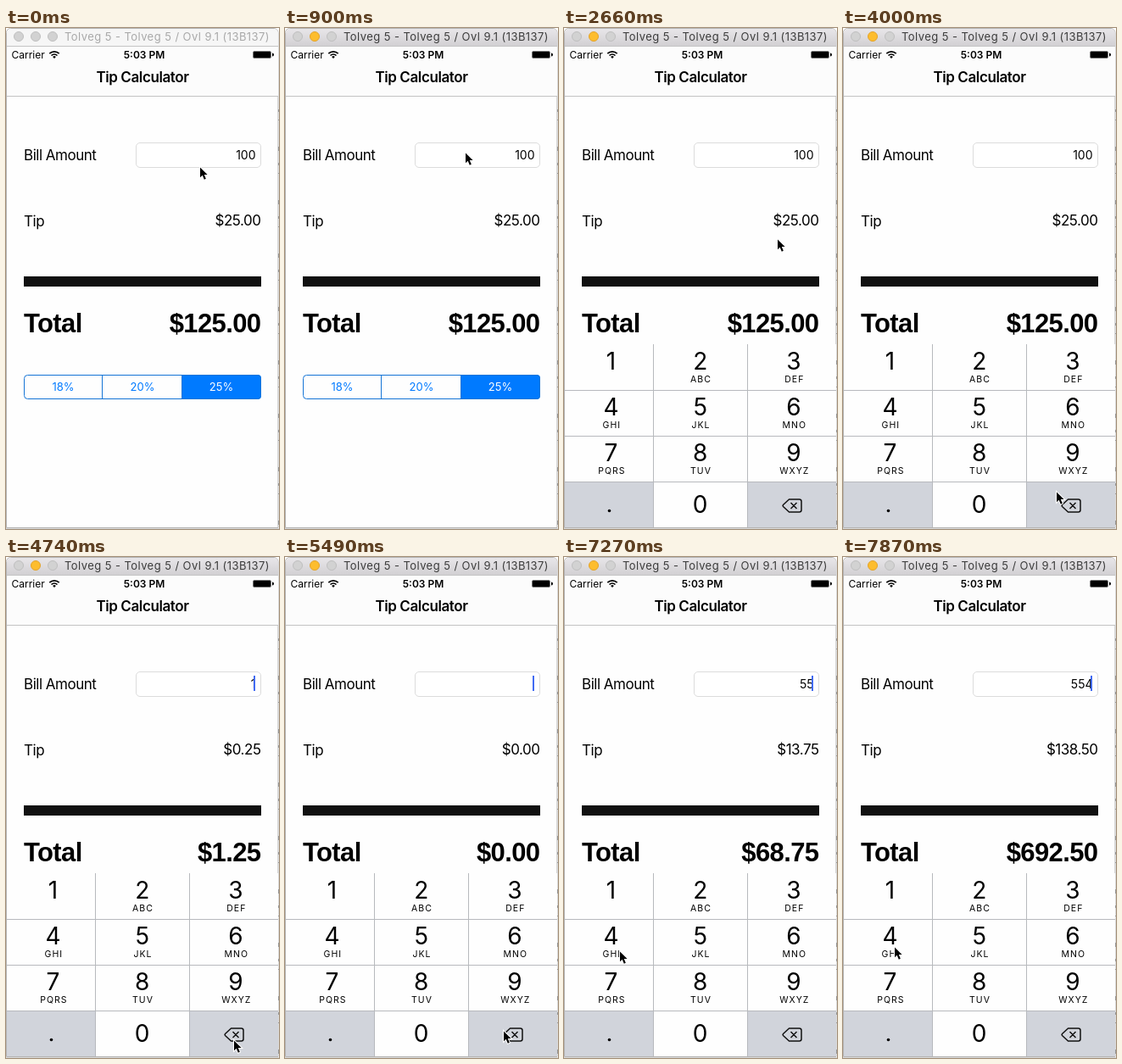
Recreate the animation shown at these times as an HTML page. Size 322 px wide and 591 px high, loop 8 s.

```html
<!DOCTYPE html>
<html lang="en">
<head>
<meta charset="utf-8">
<title>Tip Calculator</title>
<style>
html, body { margin: 0; width: 100%; height: 100%; overflow: hidden; background: #fff; }
svg { display: block; width: 322px; height: 591px; font-family: Inter, Roboto, sans-serif; }
.light { fill: #d2d2d2; stroke: #bfbfbf; }
.active .mid { fill: #fdbd2e; stroke: #e3a32b; }
.bar { fill: #f6f6f6; }
.active .bar { fill: url(#chrome); }
.name { font-size: 13px; letter-spacing: .44px; fill: #a9a9a9; }
.active .name { fill: #3c3c3c; }
.label { font-size: 17px; letter-spacing: -.48px; }
.big { font: bold 31px "Liberation Sans", Arial, sans-serif; letter-spacing: -.6px; }
.end { text-anchor: end; }
.center, .name, .digit, .abc, .seg { text-anchor: middle; }
.digit { font-size: 28px; }
.abc { font-size: 10.5px; letter-spacing: 1px; }
.seg { font-size: 13px; fill: #007aff; }
.line { fill: none; stroke: #b7b9bd; }
</style>
</head>
<body>
<svg id="stage" viewBox="0 0 322 591">
  <defs>
    <linearGradient id="chrome" x2="0" y2="1">
      <stop stop-color="#e8e6e9"/><stop offset="1" stop-color="#d2d0d3"/>
    </linearGradient>
    <clipPath id="screen"><rect x="1" y="22" width="320" height="567"/></clipPath>
  </defs>
  <path d="M321.5 96V591" stroke="#777" stroke-dasharray="3 9 1 31 5 14"/>
  <path d="M0 590.5H322" stroke="#d8d8d8"/>
  <path d="M.5 589V5.5a5 5 0 0 1 5-5H316a5 5 0 0 1 5 5V589.5H.5Z" fill="#fefefe" stroke="#b4b4b4"/>
  <path class="bar" d="M1 21V6a5 5 0 0 1 5-5H316a5 5 0 0 1 5 5V21Z"/>
  <path d="M1 21.5H321" stroke="#c4c4c4"/>
  <circle class="light" cx="15" cy="10" r="5.5"/>
  <circle class="light mid" cx="35" cy="10" r="5.5"/>
  <circle class="light" cx="55" cy="10" r="5.5"/>
  <text class="name" x="190" y="15">Tolveg 5 - Tolveg 5 / Ovl 9.1 (13B137)</text>

  <rect x="1" y="22" width="320" height="58" fill="#fcfcfc"/>
  <path d="M1 80.5H321" stroke="#c3c3c3"/>
  <text x="6.5" y="35.5" font-size="12">Carrier</text>
  <path d="M51.3 30.2a8.2 8.2 0 0 1 11.4 0M53.5 32.5a5 5 0 0 1 7 0" fill="none" stroke="#000" stroke-width="1.7"/>
  <path d="M57 36l-1.9-2a2.7 2.7 0 0 1 3.8 0Z"/>
  <text class="center" x="163" y="35.5" font-size="12" font-weight="600">5:03 PM</text>
  <rect x="291.5" y="27.5" width="21" height="8" rx="1.5" stroke="#777"/>
  <path d="M314 29.5a2 2 0 0 1 0 4Z"/>
  <text class="center" x="161" y="64" font-size="17" font-weight="600" letter-spacing="-.4">Tip Calculator</text>

  <text class="label" x="21" y="155.5">Bill Amount</text>
  <rect x="153.5" y="135.5" width="147" height="29" rx="4.5" fill="#fff" stroke="#dcdcdc"/>
  <text id="bill" class="end" x="294.5" y="154.5" font-size="14"></text>
  <rect id="caret" x="292" y="140" width="2" height="18" fill="#426bf2"/>
  <text class="label" x="21" y="233.5">Tip</text>
  <text id="tip" class="label end" x="300.5" y="232.5"></text>
  <rect x="21" y="293" width="280" height="12" fill="#111"/>
  <text class="big" x="21" y="359">Total</text>
  <text id="total" class="big end" x="300.5" y="359"></text>

  <path d="M207 409H297a4 4 0 0 1 4 4V434a4 4 0 0 1-4 4H207Z" fill="#007aff"/>
  <rect x="21.5" y="409.5" width="279" height="28" rx="4" fill="none" stroke="#1474d6"/>
  <path d="M113.5 409V438M207.5 409V438" stroke="#1474d6"/>
  <text class="seg" x="67.5" y="428">18%</text>
  <text class="seg" x="161" y="428">20%</text>
  <text class="seg" x="254" y="428" style="fill:#fff">25%</text>

  <g clip-path="url(#screen)"><g id="pad"></g></g>
  <path id="mouse" d="M1 1.5V13.2L3.7 10.8L5.8 15.7L7.8 14.8L5.8 10H9.6Z" stroke="#fff" stroke-width="2" paint-order="stroke"/>
</svg>
<script>
const STEP = 148.3, LOOP = 8000;
const GRAY = '#d1d4db', WHITE = '#fefefe';
const FOCUS = 7, SETTLED = 9;
const $ = id => document.getElementById(id);

// Mouse stops: step, x, y
const stops = [
  [0, 228, 163], [6, 212, 146], [13, 212, 146], [17, 251, 248], [19, 251, 248], [24, 159, 423],
  [28, 268, 569], [36, 268, 569], [41, 161, 462], [47, 161, 462], [49, 65, 464], [50, 60, 459]
];
// Each key stays down for one step; digits are typed on release
const presses = [[30, 'del'], [31, 'del'], [35, 'del'], [42, '5'], [45, '5'], [52, '4']];

function add(tag, attrs, text = '') {
  const el = document.createElementNS('http://www.w3.org/2000/svg', tag);
  for (const k in attrs) el.setAttribute(k, attrs[k]);
  el.textContent = text;
  $('pad').append(el);
  return el;
}

const keys = {};
const names = ['1', '2', '3', '4', '5', '6', '7', '8', '9', '.', '0', 'del'];
const letters = ['', 'ABC', 'DEF', 'GHI', 'JKL', 'MNO', 'PQRS', 'TUV', 'WXYZ'];
const edges = [1, 106, 217, 322], mids = [55.5, 160.7, 271];
names.forEach((name, i) => {
  const c = i % 3, y = 373 + 54 * Math.floor(i / 3);
  const gray = name === '.' || name === 'del';
  const rect = add('rect', { x: edges[c], y, width: edges[c + 1] - edges[c], height: 54 });
  keys[name] = { rect, up: gray ? GRAY : WHITE, down: gray ? WHITE : GRAY };
  if (name === '.') add('circle', { cx: 53.5, cy: y + 34.5, r: 1.8 });
  else if (name === 'del') {
    add('path', {
      d: 'M265.5 556H277.5a2.5 2.5 0 0 1 2.5 2.5V568.5a2.5 2.5 0 0 1-2.5 2.5H265.5L258.5 564.5a1.5 1.5 0 0 1 0-2ZM267.5 560l7 7m0-7l-7 7',
      fill: 'none', stroke: '#111', 'stroke-width': 1.5, 'stroke-linejoin': 'round'
    });
  } else {
    add('text', { class: 'digit', x: mids[c], y: y + (name === '0' ? 37 : 30) }, name);
    if (letters[i]) add('text', { class: 'abc', x: mids[c] + .8, y: y + 45 }, letters[i]);
  }
});
add('path', { class: 'line', d: 'M105.5 373V589M216.5 373V589M1 427.5H321M1 481.5H321M1 535.5H321' });

function mouseAt(k) {
  const i = stops.findIndex(s => s[0] > k);
  if (i < 0) return stops[stops.length - 1].slice(1);
  const [a, ...from] = stops[i - 1], [b, ...to] = stops[i];
  const f = (k - a) / (b - a), ease = f * f * (3 - 2 * f);
  return from.map((v, j) => Math.round(v + (to[j] - v) * ease));
}

// Bill text and the step of the last edit
function entry(k) {
  let bill = '100', edited = FOCUS;
  for (const [step, key] of presses) {
    const at = key === 'del' ? step : step + 1;
    if (at > k) break;
    bill = key === 'del' ? bill.slice(0, -1) : bill + key;
    edited = at;
  }
  return { bill, edited };
}

const money = n => '$' + n.toFixed(2);

function draw(k) {
  const { bill, edited } = entry(k);
  $('bill').textContent = bill;
  $('tip').textContent = money(bill * .25);
  $('total').textContent = money(bill * 1.25);
  $('caret').style.opacity = k >= FOCUS && (k - edited) % 7 < 4 ? 1 : 0;
  $('stage').classList.toggle('active', k >= FOCUS - 2);
  const drop = Math.min(220, Math.round(3 * .16 ** (k - SETTLED)));
  $('pad').setAttribute('transform', `translate(0 ${drop})`);
  $('mouse').setAttribute('transform', `translate(${mouseAt(k)})`);
  const press = presses.find(p => p[0] === k);
  for (const name in keys) {
    const key = keys[name];
    key.rect.setAttribute('fill', press && press[1] === name ? key.down : key.up);
  }
}

const start = performance.now();
let shown = -1;
function tick() {
  const t = (performance.now() - start) % LOOP;
  const k = Math.min(53, Math.floor((t + 12) / STEP));
  if (k !== shown) draw(shown = k);
  requestAnimationFrame(tick);
}
tick();
</script>
</body>
</html>
```
